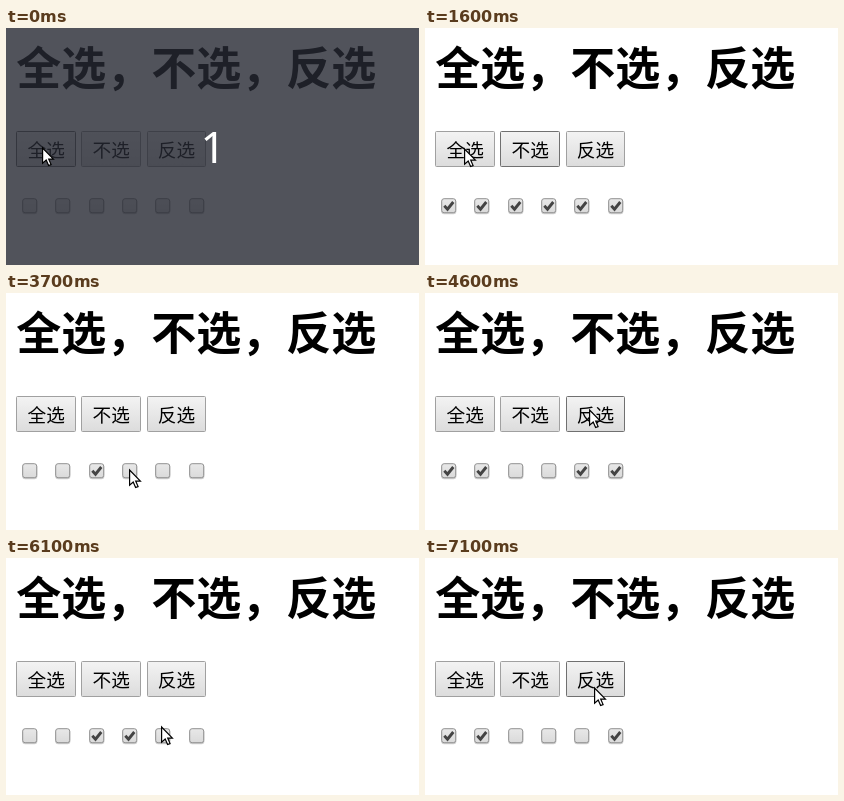
Animation, 413 px wide and 237 px high, one loop 8 s. Source, as an HTML page:

```html
<!DOCTYPE html>
<html lang="zh-CN">
<head>
<meta charset="utf-8">
<title>全选，不选，反选</title>
<style>
html, body { margin: 0; width: 100%; height: 100%; overflow: hidden; background: #fff; }
svg { display: block; width: 413px; height: 237px; }
text { font-family: "Noto Sans CJK SC", "Noto Sans CJK", "Noto Sans", sans-serif; }
.title { font-size: 45px; font-weight: 700; }
.label { font-size: 18.67px; }
.count { font: 500 44px "Noto Sans", "Open Sans", sans-serif; fill: #fff; text-anchor: middle; }
.edge { fill: url(#face); stroke: #a0a0a0; }
.press { fill: #000; opacity: 0; }
.box { fill: url(#well); stroke: #929292; }
.tick { fill: none; stroke: #444; stroke-width: 2.9; opacity: 0; }

/* Everything switches in hard steps on one 8 s clock: 1.25% = 100 ms */
.edge, .press, .tick, .veil, .cursor { animation: 8s step-end infinite; }
.veil { animation-name: veil; }
.cursor { animation-name: move; }
.all .edge { animation-name: hover-all; }
.none .edge { animation-name: hover-none; }
.invert .edge { animation-name: hover-invert; }
.all .press { animation-name: press-all; }
.invert .press { animation-name: press-invert; }
.tick { animation-name: tick; }
.third { animation-name: tick-third; }
.fourth { animation-name: tick-fourth; }
.fifth { animation-name: tick-fifth; }

@keyframes veil { 0% { opacity: 1; } 5%, 100% { opacity: 0; } }

@keyframes hover-all { 0% { stroke: #707070; } 20%, 100% { stroke: #a0a0a0; } }
@keyframes hover-none {
  0%, 35%, 100% { stroke: #a0a0a0; }
  20% { stroke: #707070; }
}
@keyframes hover-invert {
  0%, 73.75% { stroke: #a0a0a0; }
  53.75%, 85%, 100% { stroke: #707070; }
}

@keyframes press-all {
  0%, 10%, 100% { opacity: 0; }
  8.75% { opacity: .08; }
}
@keyframes press-invert {
  0%, 57.5%, 71.25%, 88.75%, 100% { opacity: 0; }
  56.25%, 70%, 87.5% { opacity: .08; }
}

@keyframes tick {
  0%, 27.5%, 71.25% { opacity: 0; }
  10%, 57.5%, 88.75%, 100% { opacity: 1; }
}
@keyframes tick-third {
  0%, 27.5%, 57.5%, 88.75%, 100% { opacity: 0; }
  10%, 41.25%, 71.25% { opacity: 1; }
}
@keyframes tick-fourth {
  0%, 27.5%, 57.5%, 88.75%, 100% { opacity: 0; }
  10%, 47.5%, 71.25% { opacity: 1; }
}
@keyframes tick-fifth {
  0%, 27.5%, 71.25%, 88.75%, 100% { opacity: 0; }
  10%, 57.5%, 78.75% { opacity: 1; }
}

@keyframes move {
  0% { transform: translate(36px, 119px); }
  20% { transform: translate(39px, 120px); }
  22.5% { transform: translate(68px, 121px); }
  23.75% { transform: translate(98px, 121px); }
  35% { transform: translate(98px, 124px); }
  37.5% { transform: translate(101px, 140px); }
  38.75% { transform: translate(93px, 162px); }
  40% { transform: translate(87px, 172px); }
  41.25% { transform: translate(88px, 173px); }
  43.75% { transform: translate(108px, 175px); }
  46.25% { transform: translate(123px, 176px); }
  48.75% { transform: translate(124px, 176px); }
  51.25% { transform: translate(128px, 168px); }
  52.5% { transform: translate(140px, 148px); }
  53.75% { transform: translate(152px, 130px); }
  55% { transform: translate(161px, 119px); }
  56.25% { transform: translate(164px, 116px); }
  73.75% { transform: translate(161px, 131px); }
  75% { transform: translate(157px, 152px); }
  76.25% { transform: translate(155px, 168px); }
  77.5% { transform: translate(154px, 173px); }
  80% { transform: translate(156px, 172px); }
  81.25% { transform: translate(160px, 162px); }
  82.5% { transform: translate(165px, 150px); }
  83.75% { transform: translate(168px, 141px); }
  85%, 100% { transform: translate(169px, 129px); }
}
</style>
</head>
<body>
<svg viewBox="0 0 413 237">
  <defs>
    <linearGradient id="face" x2="0" y2="1">
      <stop offset="0" stop-color="#f3f3f3"/>
      <stop offset=".35" stop-color="#ebebeb"/>
      <stop offset="1" stop-color="#dcdcdc"/>
    </linearGradient>
    <linearGradient id="well" x2="0" y2="1">
      <stop offset="0" stop-color="#e8e8e8"/>
      <stop offset="1" stop-color="#dadada"/>
    </linearGradient>
    <g id="check">
      <rect x=".2" y="1" width="15.2" height="15.2" rx="3" fill-opacity=".2"/>
      <rect class="box" x=".7" y=".7" width="14" height="14" rx="2.4"/>
    </g>
    <path id="mark" d="M3.3 7.8l3.2 3.4 5.8-7.2"/>
  </defs>

  <text class="title" x="10.3" y="57">全选，不选，反选</text>

  <g class="all">
    <rect class="edge" x="10.5" y="103.5" width="59" height="35" rx="1"/>
    <rect class="press" x="11" y="104" width="58" height="34"/>
    <text class="label" x="21.5" y="128.5">全选</text>
  </g>
  <g class="none">
    <rect class="edge" x="75.5" y="103.5" width="59" height="35" rx="1"/>
    <text class="label" x="86.5" y="128.5">不选</text>
  </g>
  <g class="invert">
    <rect class="edge" x="141.5" y="103.5" width="58" height="35" rx="1"/>
    <rect class="press" x="142" y="104" width="57" height="34"/>
    <text class="label" x="151.8" y="128.5">反选</text>
  </g>

  <g transform="translate(0 170)">
    <use href="#check" x="16"/>
    <use href="#check" x="49"/>
    <use href="#check" x="83"/>
    <use href="#check" x="116"/>
    <use href="#check" x="149"/>
    <use href="#check" x="183"/>
    <use class="tick" href="#mark" x="16"/>
    <use class="tick" href="#mark" x="49"/>
    <use class="tick third" href="#mark" x="83"/>
    <use class="tick fourth" href="#mark" x="116"/>
    <use class="tick fifth" href="#mark" x="149"/>
    <use class="tick" href="#mark" x="183"/>
  </g>

  <g class="veil">
    <rect width="413" height="237" fill="#262932" fill-opacity=".8"/>
    <text class="count" x="207" y="135">1</text>
  </g>

  <g class="cursor">
    <path d="M.6 1V16.2L4.2 13 6.6 18.6 9.1 17.6 6.7 12.1H11.4Z" fill="#fff" stroke="#000" stroke-width="1.2"/>
  </g>
</svg>
</body>
</html>
```
